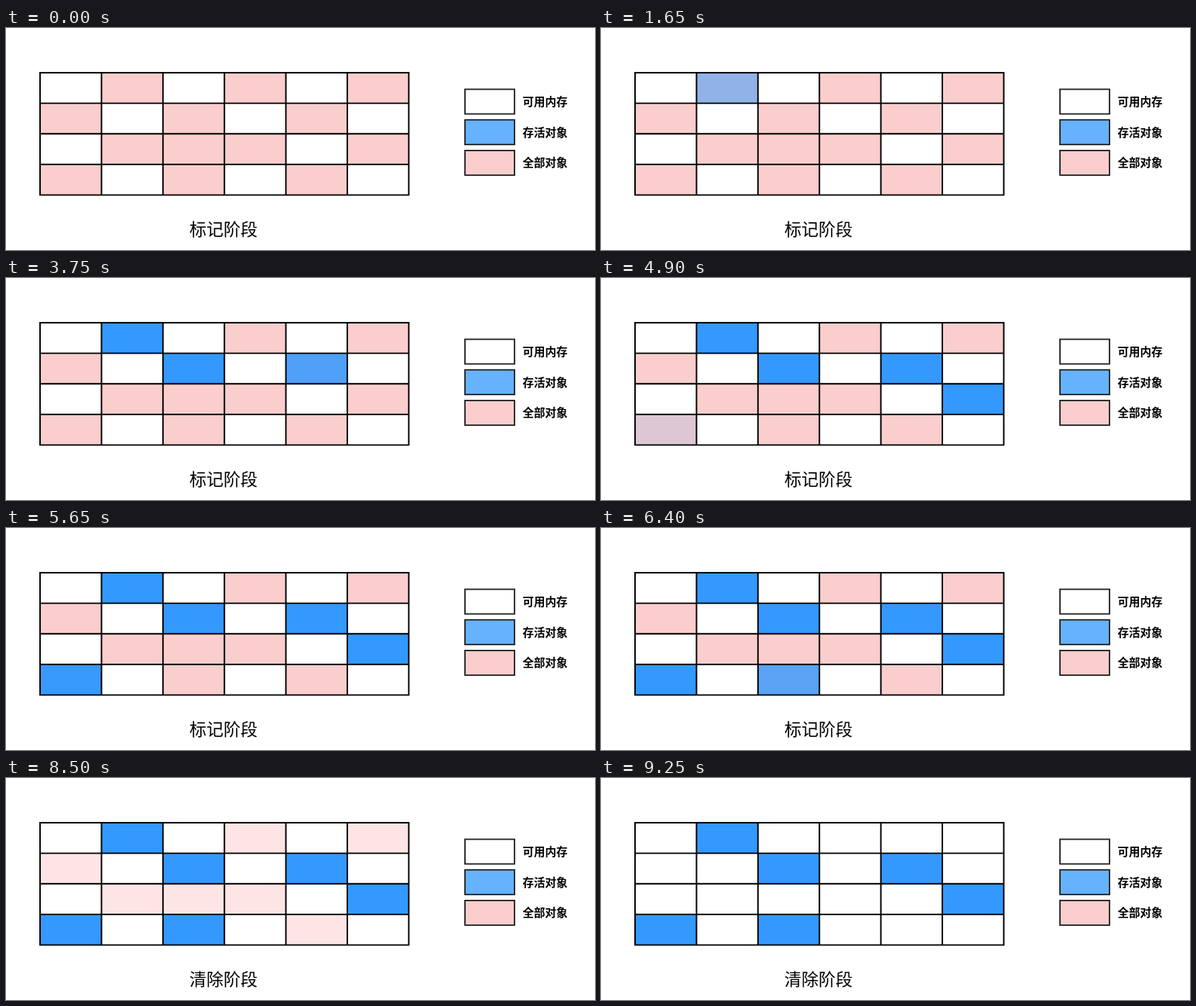
Animation of 761 by 288 pixels, one loop 9900 ms. Source, as an HTML page:

```html
<!DOCTYPE html>
<html lang="zh-CN">
<head>
<meta charset="utf-8">
<style>
  html, body { margin: 0; width: 100%; height: 100%; overflow: hidden; background: #fff; }
  svg { display: block; }
  text { font-family: "Noto Sans CJK SC", "Noto Sans CJK", sans-serif; fill: #000; }
  .label { font-size: 14.5px; font-weight: 700; }
  .phase { font-size: 22px; }
</style>
</head>
<body>
<svg id="stage" width="761" height="288" viewBox="0 0 761 288"></svg>
<script>
const LOOP = 9900, STEP = 50;
const WHITE = [255, 255, 255], PINK = [250, 206, 205], BLUE = [51, 153, 255];
const LAYOUT = [".#.#.#", "#.#.#.", ".###.#", "#.#.#."];
const LIVE = ["0,1", "1,2", "1,4", "2,5", "3,0", "3,2"];  // row,column in marking order
const MARK_START = 1175, MARK_TIME = 900;
const TEXT_START = 6550, TEXT_TIME = 600;
const SWEEP_START = 7850, SWEEP_TIME = 1400;
const LEFT = 44, TOP = 58, CELL_W = 79.4, CELL_H = 39.65;

const stage = document.getElementById("stage");

function add(tag, attrs, content = "") {
  const node = document.createElementNS("http://www.w3.org/2000/svg", tag);
  for (const key in attrs) node.setAttribute(key, attrs[key]);
  node.textContent = content;
  return stage.appendChild(node);
}

const rgb = color => `rgb(${color.map(Math.round)})`;
const mix = (a, b, k) => rgb(a.map((v, i) => v + (b[i] - v) * k));
const progress = (t, start, time) => Math.min(1, Math.max(0, (t - start) / time));

const cells = [];
LAYOUT.forEach((line, row) => [...line].forEach((mark, col) => {
  const node = add("rect", {
    x: LEFT + col * CELL_W, y: TOP + row * CELL_H,
    width: CELL_W, height: CELL_H, fill: rgb(WHITE)
  });
  if (mark === "#") cells.push({ node, order: LIVE.indexOf(`${row},${col}`) });
}));

let grid = "";
for (let i = 0; i <= 6; i++) grid += `M${LEFT + i * CELL_W} ${TOP - 1}v${4 * CELL_H + 2}`;
for (let i = 0; i <= 4; i++) grid += `M${LEFT} ${TOP + i * CELL_H}h${6 * CELL_W}`;
add("path", { d: grid, stroke: "#000", "stroke-width": 1.9, fill: "none" });

[["可用内存", WHITE], ["存活对象", [102, 178, 255]], ["全部对象", PINK]].forEach(([name, color], i) => {
  const y = 79.5 + i * 39.7;
  add("rect", { x: 593, y, width: 64, height: 32, fill: rgb(color), stroke: "#222", "stroke-width": 1.8 });
  add("text", { x: 667.5, y: y + 21.5, class: "label" }, name);
});

const [marking, sweeping] = ["标记阶段", "清除阶段"].map(
  name => add("text", { x: 237, y: 269, class: "phase" }, name));

function draw(t) {
  const sweep = progress(t, SWEEP_START, SWEEP_TIME);
  for (const { node, order } of cells) {
    node.setAttribute("fill", order < 0
      ? mix(PINK, WHITE, sweep)
      : mix(PINK, BLUE, progress(t, MARK_START + order * MARK_TIME, MARK_TIME)));
  }
  marking.setAttribute("opacity", 1 - progress(t, TEXT_START, TEXT_TIME));
  sweeping.setAttribute("opacity", progress(t, TEXT_START + TEXT_TIME, TEXT_TIME));
}

const origin = performance.now();
function tick() {
  const t = (performance.now() - origin) % LOOP;
  draw(Math.floor(t / STEP) * STEP);
  requestAnimationFrame(tick);
}
tick();
</script>
</body>
</html>
```
